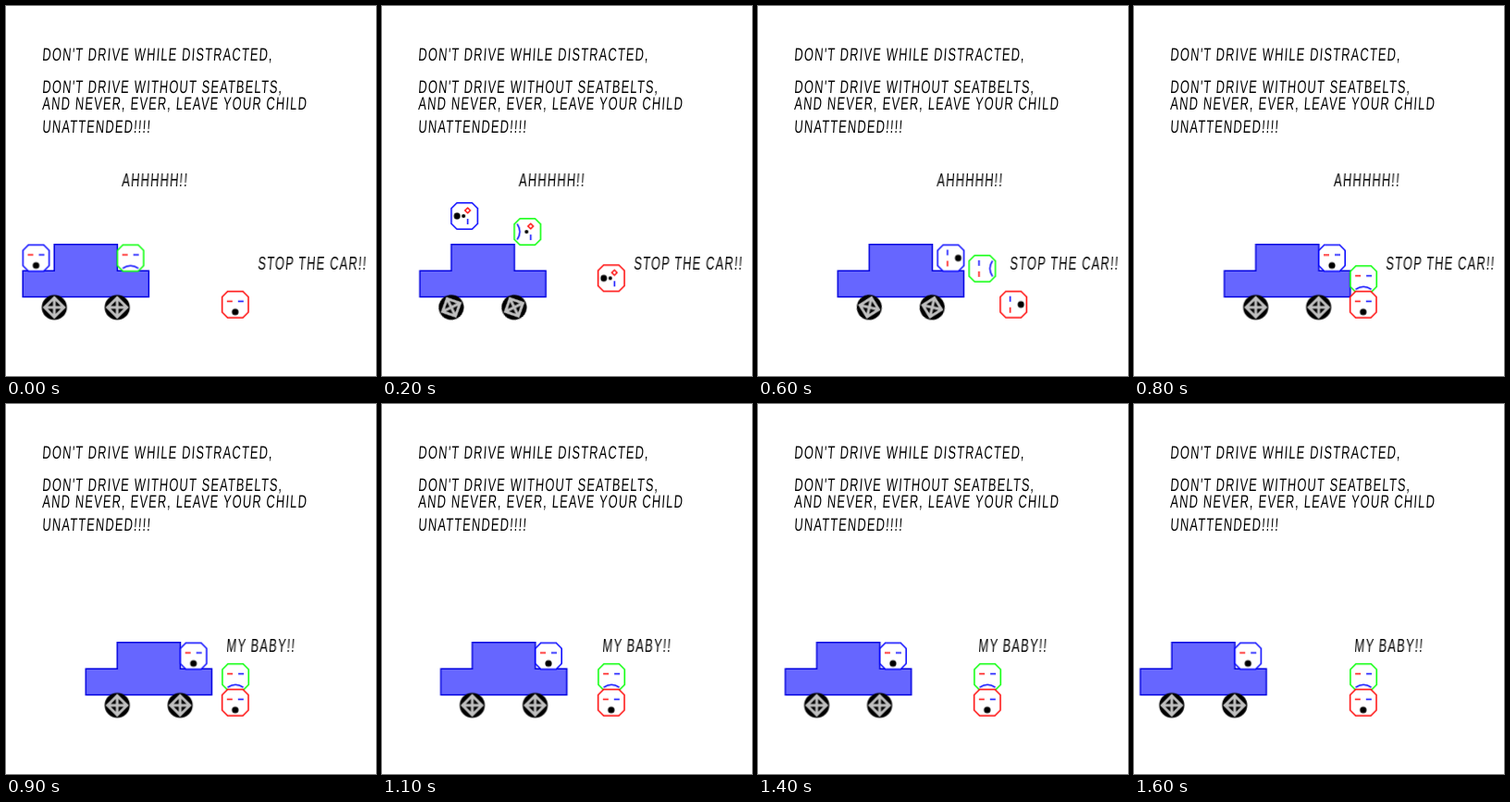
Animation of 400x400 px, one loop 1.7 s. Source, as an HTML page without scripts:

```html
<!DOCTYPE html>
<html lang="en">
<head>
<meta charset="utf-8">
<title>Drive safely</title>
<style>
  html, body { margin: 0; width: 100%; height: 100%; overflow: hidden; background: #fff; }
  svg { display: block; width: 100vw; height: 100vh; }
  text {
    font: 19.5px "Liberation Sans", Arial, sans-serif;
    letter-spacing: 1.8px;
    transform: skewX(-4deg) scaleX(.66);
  }

  /* One loop is 17 ticks of 100 ms; one tick = 5.882 % */
  .anim { animation: 1.7s -4ms step-end infinite; }
  .car { animation-name: drive; }
  .wheel { animation-name: spin; }
  .flip { animation-name: flip; }
  .driver { animation-name: driver; }
  .parent { animation-name: parent; }
  .scream { animation-name: scream; }
  .before { animation-name: before; }
  .after { animation-name: after; }
  .eye { animation-name: eye; }
  .dizzy { animation-name: dizzy; }

  @keyframes drive {
    0% { transform: translateX(0); animation-timing-function: steps(7); }
    41.176% { transform: translateX(79.45px); }
    47.059% { transform: translateX(79.45px); animation-timing-function: steps(8); }
    94.118%, 100% { transform: translateX(-11.35px); }
  }
  @keyframes spin {
    0% { transform: rotate(0deg); animation-timing-function: steps(7); }
    41.176%, 100% { transform: rotate(540deg); }
  }
  @keyframes flip {
    0% { transform: rotate(0deg); animation-timing-function: steps(8); }
    47.059%, 100% { transform: rotate(360deg); }
  }
  @keyframes driver {
    0% { transform: translate(46.7px, 258.3px); }
    5.882% { transform: translate(80.7px, 235.6px); animation-timing-function: steps(4); }
    29.412% { transform: translate(171.5px, 258.3px); animation-timing-function: steps(2); }
    41.176% { transform: translate(216.9px, 258.3px); }
    47.059% { transform: translate(228.2px, 258.3px); animation-timing-function: steps(8); }
    94.118%, 100% { transform: translate(137.4px, 258.3px); }
  }
  @keyframes parent {
    0% { transform: translate(148.8px, 258.3px); animation-timing-function: steps(4); }
    23.529% { transform: translate(194.2px, 258.3px); animation-timing-function: steps(4); }
    47.059%, 100% { transform: translate(262.3px, 281px); }
  }
  @keyframes scream {
    0% { transform: translateX(0); animation-timing-function: steps(8); }
    47.059%, 100% { transform: translateX(90.8px); }
  }
  @keyframes before { 0% { opacity: 1; } 52.941%, 100% { opacity: 0; } }
  @keyframes after { 0% { opacity: 0; } 52.941%, 100% { opacity: 1; } }
  @keyframes eye { 0%, 17.647%, 100% { opacity: 1; } 11.765% { opacity: 0; } }
  @keyframes dizzy { 0%, 17.647%, 100% { opacity: 0; } 11.765% { opacity: 1; } }
</style>
</head>
<body>
<svg viewBox="0 0 400 400">
  <defs>
    <!-- Faces are centred on the origin -->
    <g id="head" fill="none" stroke-width="1.5">
      <path d="M-8.2-14.2H8.2L14.2-8.2V8.2L8.2 14.2H-8.2L-14.2 8.2V-8.2Z" fill="#fff" stroke="currentColor"/>
      <path d="M3-3.5H9" stroke="#00f"/>
    </g>
    <path id="eye" d="M-9-3.5H-3" stroke="#f00" stroke-width="1.5"/>
    <g id="dizzy">
      <circle cy="1" r="2"/>
      <path d="M-6-6.2L-3.2-3.4L-6-.6L-8.8-3.4Z" fill="#fff" stroke="#f00" stroke-width="1.4"/>
    </g>
    <circle id="shout" cy="8" r="3.6"/>
    <path id="frown" d="M-8.5 11.2Q0 5.2 8.5 11.2" fill="none" stroke="#00f" stroke-width="1.5"/>
    <g id="wheel">
      <circle r="13.6"/>
      <path d="M0-10.5L10.5 0L0 10.5L-10.5 0ZM0-11V11M-11 0H11" fill="none" stroke="#c0c0c0" stroke-width="3"/>
    </g>
  </defs>

  <g transform="translate(39 59)"><text>DON'T DRIVE WHILE DISTRACTED,</text></g>
  <g transform="translate(39 94)"><text>DON'T DRIVE WITHOUT SEATBELTS,</text></g>
  <g transform="translate(39 112)"><text>AND NEVER, EVER, LEAVE YOUR CHILD</text></g>
  <g transform="translate(39 137)"><text>UNATTENDED!!!!</text></g>

  <g class="anim before">
    <g class="anim scream">
      <g transform="translate(125 195)"><text>AHHHHH!!</text></g>
    </g>
    <g transform="translate(272 285)"><text>STOP THE CAR!!</text></g>
  </g>
  <g class="anim after">
    <g transform="translate(238 268)"><text>MY BABY!!</text></g>
  </g>

  <g class="anim car">
    <path d="M18.2 286.2H52.2V257.8H120.4V286.2H154.4V314.4H18.2Z" fill="#66f" stroke="#0000e0" stroke-width="1.5"/>
    <g transform="translate(52.2 325.8)"><use href="#wheel" class="anim wheel"/></g>
    <g transform="translate(120.2 325.8)"><use href="#wheel" class="anim wheel"/></g>
  </g>

  <!-- Each face tumbles around its upper right corner -->
  <g class="anim driver" color="#00f">
    <g class="anim flip">
      <g transform="translate(-14.2 14.2)">
        <use href="#head"/><use href="#shout"/>
        <use href="#eye" class="anim eye"/><use href="#dizzy" class="anim dizzy"/>
      </g>
    </g>
  </g>
  <g class="anim parent" color="#0f0">
    <g class="anim flip">
      <g transform="translate(-14.2 14.2)">
        <use href="#head"/><use href="#frown"/>
        <use href="#eye" class="anim eye"/><use href="#dizzy" class="anim dizzy"/>
      </g>
    </g>
  </g>
  <g transform="translate(262 308.5)" color="#f00">
    <g class="anim flip">
      <g transform="translate(-14.2 14.2)">
        <use href="#head"/><use href="#shout"/>
        <use href="#eye" class="anim eye"/><use href="#dizzy" class="anim dizzy"/>
      </g>
    </g>
  </g>
</svg>
</body>
</html>
```
